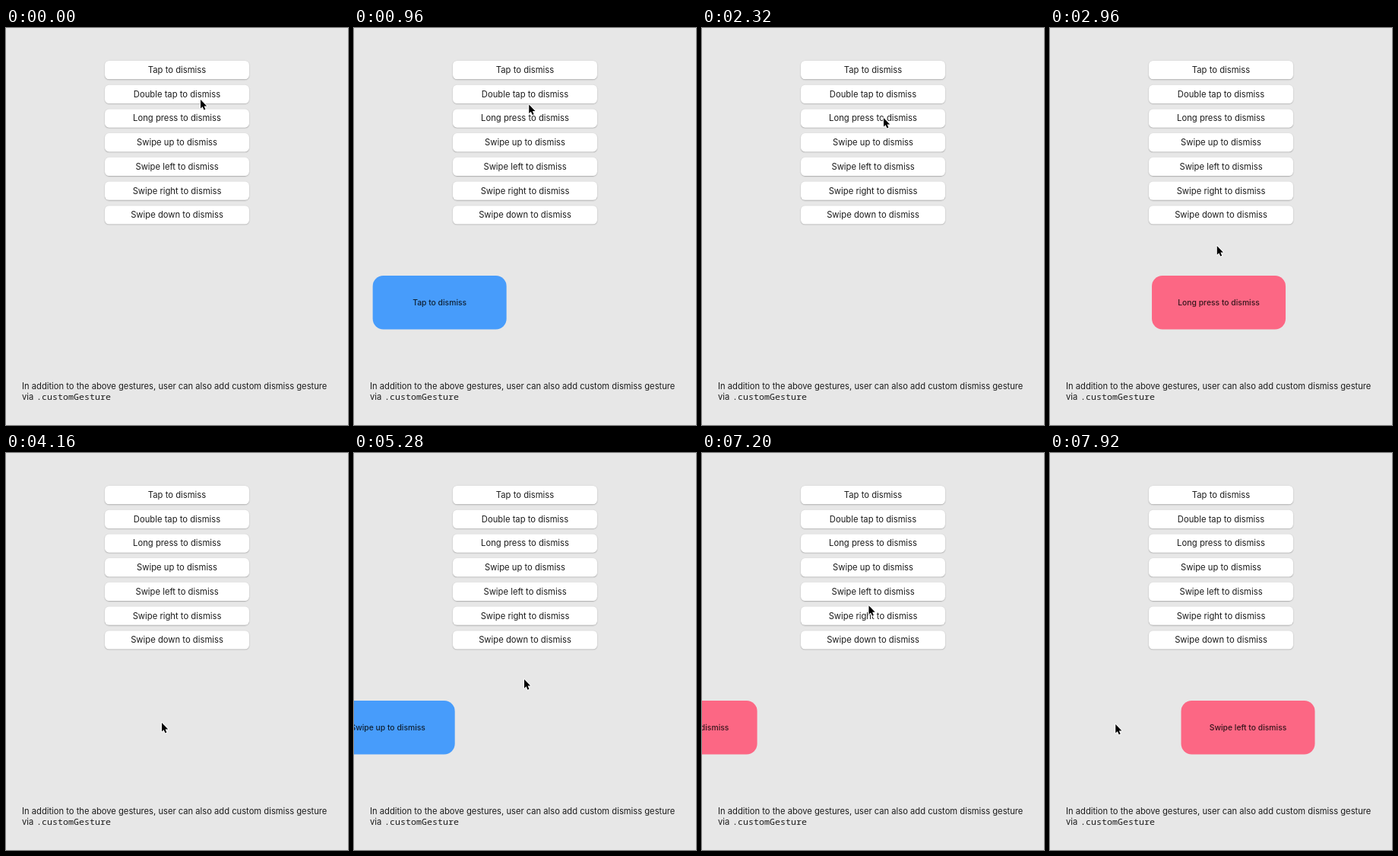
Recreate the animation shown at these times as an HTML page with a canvas. Size 450 by 521 pixels, loop 8000 ms.

```html
<!DOCTYPE html>
<html lang="en">
<meta charset="utf-8">
<title>Dismiss gestures</title>
<style>
  html, body { margin: 0; overflow: hidden; background: #e7e7e7; }
  canvas { display: block; width: 450px; height: 521px; }
</style>
<canvas id="stage"></canvas>
<script>
const LOOP = 8000, STEP = 80;
const SANS = 'Inter, sans-serif', MONO = '"Noto Sans Mono", monospace';
const BLUE = '#479cfb', PINK = '#fc6784';

const labels = ['Tap', 'Double tap', 'Long press', 'Swipe up', 'Swipe left', 'Swipe right', 'Swipe down']
  .map(gesture => gesture + ' to dismiss');

const popups = [
  { row: 0, color: BLUE, press: 640, release: 800, enter: 790, leave: 1734 },
  { row: 2, color: PINK, press: 2560, release: 2640, enter: 2626, leave: 3734 },
  { row: 3, color: BLUE, press: 5040, release: 5120, enter: 5172, leave: 5974 },
  { row: 4, color: PINK, press: 7040, release: 7120, enter: 7140, leave: 7814 },
];

// Pointer moves: start, end, target x, target y
const moves = [
  [0, 0, 256, 94], [20, 480, 233, 58], [790, 1500, 214, 352], [1800, 2320, 239, 118],
  [2560, 3180, 212, 354], [3760, 4160, 205, 354], [4240, 4900, 222, 149],
  [5120, 5380, 225, 370], [5760, 6000, 222, 325], [6040, 6680, 217, 152],
  [6800, 7000, 222, 180], [7120, 7500, 200, 357], [7560, 7930, 86, 356],
];

const canvas = document.getElementById('stage');
const ctx = canvas.getContext('2d');
const ratio = window.devicePixelRatio || 1;
canvas.width = 450 * ratio;
canvas.height = 521 * ratio;
ctx.scale(ratio, ratio);

const clamp = u => Math.min(1, Math.max(0, u));
const smooth = u => u * u * (3 - 2 * u);

// cubic-bezier(x1, 0, x2, 1)
function bezier(x1, x2, u) {
  let low = 0, high = 1;
  for (let i = 0; i < 20; i++) {
    const s = (low + high) / 2, r = 1 - s;
    if (3 * r * r * s * x1 + 3 * r * s * s * x2 + s * s * s < u) low = s;
    else high = s;
  }
  return smooth(low);
}

function box(x, y, w, h, radius, color) {
  ctx.fillStyle = color;
  ctx.beginPath();
  ctx.roundRect(x, y, w, h, radius);
  ctx.fill();
}

function text(string, x, y, font, align = 'center', color = '#1c1c1c') {
  ctx.font = font;
  ctx.textAlign = align;
  ctx.fillStyle = color;
  ctx.fillText(string, x, y);
}

function drawButton(label, row, pressed) {
  const y = 43 + row * 31.7;
  ctx.save();
  ctx.shadowColor = 'rgba(0,0,0,.32)';
  ctx.shadowBlur = 1.5 * ratio;
  ctx.shadowOffsetY = 0.6 * ratio;
  box(130, y, 190, 24.3, 5.5, pressed ? '#f0f0f0' : '#fff');
  ctx.restore();
  text(label, 225, y + 16, `11.25px ${SANS}`);
}

function drawPopup({ row, color, enter, leave }, t) {
  if (t < enter || t > leave + 460) return;
  const slideIn = bezier(0, 0.58, clamp((t - enter) / 360));
  const slideOut = bezier(0.42, 0.58, clamp((t - leave) / 460));
  const x = 137 + 325 * (slideIn - 1 + slideOut);
  box(x, 325, 176, 70.5, 14, color);
  text(labels[row], x + 88, 364, `500 10.35px ${SANS}`, 'center', 'rgba(0,0,0,.8)');
}

function drawPointer(t) {
  let x = 0, y = 0;
  for (const [start, end, toX, toY] of moves) {
    if (t < start) break;
    const u = smooth(clamp((t - start) / (end - start || 1) + (end === start)));
    x += (toX - x) * u;
    y += (toY - y) * u;
  }
  ctx.save();
  ctx.translate(x, y);
  ctx.lineJoin = 'round';
  ctx.lineWidth = 1.8;
  ctx.strokeStyle = '#fff';
  ctx.fillStyle = '#000';
  const arrow = new Path2D('M0 0V11.6L2.6 9.2L4.5 13.6L6.4 12.8L4.6 8.5H8.2Z');
  ctx.stroke(arrow);
  ctx.fill(arrow);
  ctx.restore();
}

function draw(t) {
  ctx.fillStyle = '#e7e7e7';
  ctx.fillRect(0, 0, 450, 521);
  labels.forEach((label, row) => drawButton(label, row,
    popups.some(p => p.row === row && t >= p.press && t < p.release)));
  const body = `11.2px ${SANS}`;
  text('In addition to the above gestures, user can also add custom dismiss gesture', 21, 473.5, body, 'left');
  text('via', 21, 487.5, body, 'left');
  text('.customGesture', 40, 487.5, `11.67px ${MONO}`, 'left');
  popups.forEach(popup => drawPopup(popup, t));
  drawPointer(t);
}

function tick() {
  const t = performance.now() % LOOP;
  draw(Math.floor(t / STEP) * STEP);
  requestAnimationFrame(tick);
}
tick();
</script>
</html>
```
